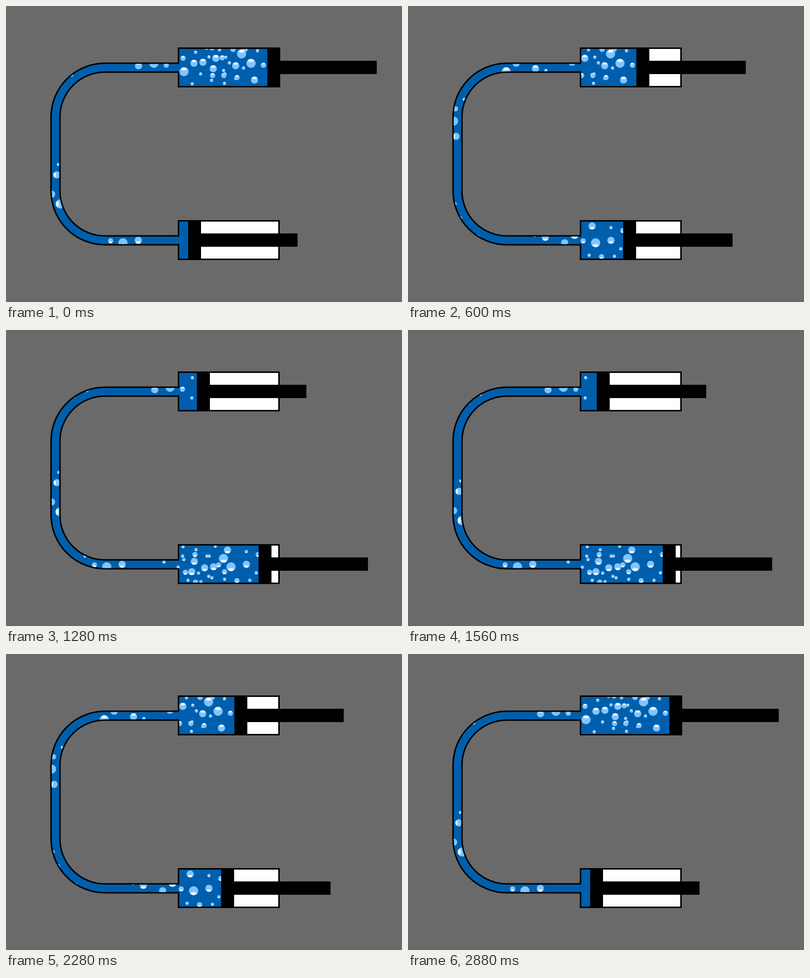
These frames come from a looping animation (800 by 600 pixels, 3 s). An HTML page with a canvas:

```html
<!DOCTYPE html>
<html>
<head>
<meta charset="utf-8">
<title>Hydraulic cylinders</title>
<style>
html, body { margin: 0; width: 100%; height: 100%; overflow: hidden; background: #6a6a6a; }
canvas { display: block; }
</style>
</head>
<body>
<canvas id="stage" width="800" height="600"></canvas>
<script>
const ctx = document.getElementById('stage').getContext('2d');

const TRAVEL = 160;       // piston stroke in px
const SPACING = 50.17;    // gap between bubble clusters, in piston travel
const PIPE_SPEED = 3.95;  // pipe flow relative to piston speed
const PIPE_TIME = 191.8;  // piston travel needed to cross the pipe
const LEAD = 300;         // track length before the pipe entrance

// Bubbles as [along flow, outward, radius] around each cluster's centre
const clusterA = [
  [-17, -25, 7], [21, -22, 3], [45, -16, 5], [21, 4, 7], [-10, 9, 9], [-35, 5, 5],
  [-23, 34, 3], [2, 37, 5], [28, 36, 3], [41, 21, 3], [-54, -13, 3], [-55, 28, 3]
];
const clusterB = [
  [-45, -1, 3], [-41, 28, 9], [-32, -20, 5], [-24, 37, 5], [-16.5, 9.5, 3], [-7.5, -13, 3],
  [-6.5, -32, 3], [3.5, 36, 3], [11, 19, 7], [17.5, -16, 5], [29.5, 39, 3], [37, 11, 7]
];
const clusterC = [
  [-55, -6, 3], [-52, 20, 5], [-34, -2, 7], [-30.5, -26, 3], [-31.5, 40, 5], [-25.5, 21.5, 3],
  [-8.5, -13, 3], [1.5, 31, 3], [5, 9, 7], [8.5, -33, 3], [25, -8, 9], [27, 19, 5]
];
const clusters = [clusterA, clusterB, clusterC];

const track = document.createElementNS('http://www.w3.org/2000/svg', 'path');
track.setAttribute('d', 'M650 125H200A99 100 0 0 0 101 225V375A99 96 0 0 0 200 471H650');

const pipe = new Path2D('M350 125H200A100 100 0 0 0 100 225V375A100 100 0 0 0 200 475H350');
const fluid = new Path2D(
  'M351 117.5H200A107.5 107.5 0 0 0 92.5 225V375A107.5 107.5 0 0 0 200 482.5H351' +
  'V467.5H200A92.5 92.5 0 0 1 107.5 375V225A92.5 92.5 0 0 1 200 132.5H351Z' +
  'M350 87V162H550V87ZM350 437V512H550V437Z');

function box(color, x, y, w, h) {
  ctx.fillStyle = color;
  ctx.fillRect(x, y, w, h);
}

function bubble([x, y, r]) {
  r += 0.3;
  ctx.fillStyle = '#80c4ff';
  ctx.beginPath();
  ctx.arc(x, y, r, 0, 7);
  ctx.fill();
  const shine = ctx.createLinearGradient(0, y + r * 0.9, 0, y + r * 0.2);
  shine.addColorStop(0, '#fff');
  shine.addColorStop(0.5, '#fff');
  shine.addColorStop(1, '#c4e3ff');
  ctx.fillStyle = shine;
  ctx.beginPath();
  ctx.ellipse(x, y + r * 0.56, r * 0.62, r * 0.32, 0, 0, 7);
  ctx.fill();
}

// Slow in the cylinders, fast in the pipe
function trackLength(flow) {
  const inPipe = Math.min(Math.max(flow, 0), PIPE_TIME);
  return LEAD + flow + inPipe * (PIPE_SPEED - 1);
}

function drawCluster(index, shift) {
  const s = trackLength(index * SPACING - 135 + shift);
  const p = track.getPointAtLength(s);
  const a = track.getPointAtLength(s - 0.5);
  const b = track.getPointAtLength(s + 0.5);
  ctx.save();
  ctx.translate(p.x, p.y);
  ctx.rotate(Math.atan2(b.y - a.y, b.x - a.x));
  clusters[index % 3].forEach(bubble);
  ctx.restore();
}

function drawPiston(x, y) {
  box('#fff', x + 26, y - 38, Math.max(0, 550 - x - 26), 75);
  box('#000', x, y - 40.5, 26, 80);
  box('#000', x + 20, y - 14, 201, 27);
}

function draw(time) {
  const step = Math.min(72, Math.floor((time % 3000) / 40 + 0.001));
  const shift = TRAVEL * (1 - Math.abs(step / 36 - 1));

  box('#6a6a6a', 0, 0, 800, 600);
  ctx.strokeStyle = '#000';
  ctx.lineWidth = 21;
  ctx.stroke(pipe);
  for (const y of [84, 434]) box('#000', 347, y, 206, 81);
  ctx.fillStyle = '#005fac';
  ctx.fill(fluid);

  ctx.save();
  ctx.clip(fluid);
  for (let i = 0; i < 7; i++) drawCluster(i, shift);
  ctx.restore();

  drawPiston(528 - shift, 125);
  drawPiston(368 + shift, 475);
}

const start = performance.now();
function tick() {
  draw(performance.now() - start);
  requestAnimationFrame(tick);
}
tick();
</script>
</body>
</html>
```
